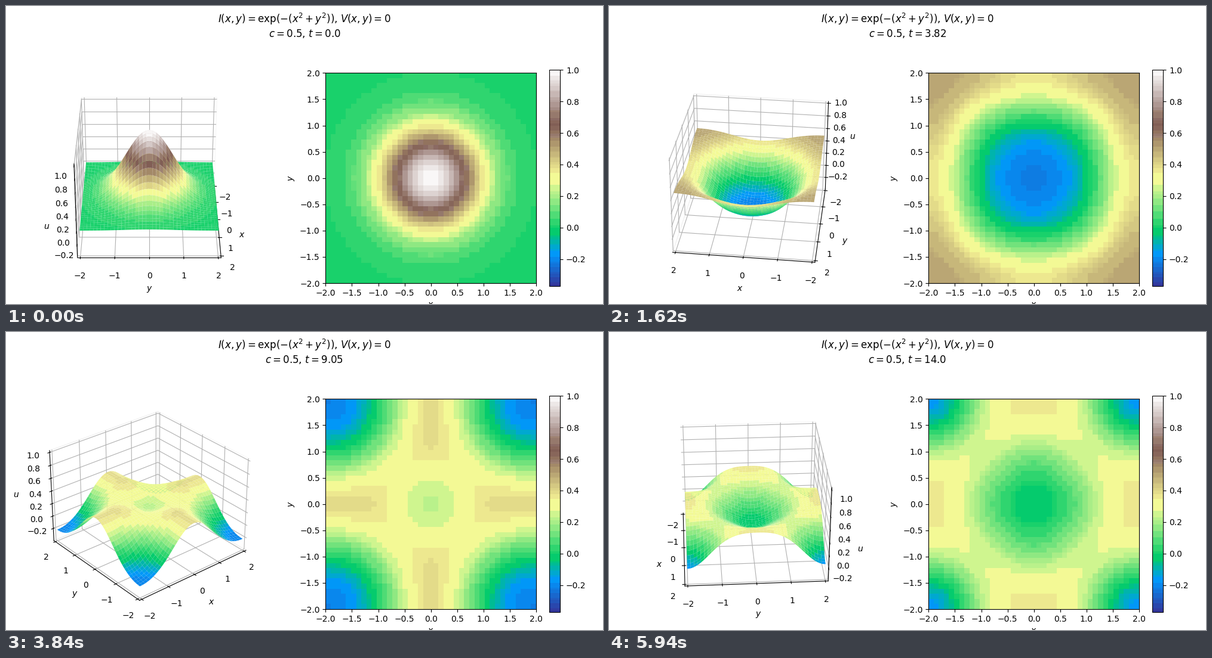
Recreate the animation shown at these times as a matplotlib script. Size 1000 px wide and 500 px high, loop 6000 ms.

```python
import matplotlib.pyplot as plt
import numpy as np
from matplotlib.animation import FuncAnimation
from matplotlib.colors import ListedColormap

WIDTH, HEIGHT, DPI = 1000, 500, 100
FRAMES, INTERVAL = 100, 60
C, END, N = 0.5, 14, 41

plt.rcParams["axes3d.automargin"] = True


def laplacian(u):
    """Five-point sum with reflecting edges."""
    p = np.pad(u, 1, mode="reflect")
    return p[2:, 1:-1] + p[:-2, 1:-1] + p[1:-1, 2:] + p[1:-1, :-2] - 4 * u


def solve_wave(u0, courant2, steps):
    waves = [u0, u0 + 0.5 * courant2 * laplacian(u0)]
    while len(waves) < steps:
        u = waves[-1]
        waves.append(2 * u - waves[-2] + courant2 * laplacian(u))
    return np.array(waves)


def banded_terrain():
    """Terrain colours merged into coarse RGB cells."""
    lut = np.round(plt.get_cmap("terrain")(np.arange(256))[:, :3] * 255).astype(int)
    _, group = np.unique(lut // [32, 16, 32], axis=0, return_inverse=True)
    group = group.ravel()
    return ListedColormap([lut[group == g].mean(axis=0) / 255 for g in group])


def corners(a):
    """Four corner values of every grid cell."""
    return np.stack([a[:-1, :-1], a[:-1, 1:], a[1:, 1:], a[1:, :-1]], axis=-1).reshape(-1, 4)


def rect(left, bottom, width, height):
    return [left / WIDTH, bottom / HEIGHT, width / WIDTH, height / HEIGHT]


grid = np.linspace(-2, 2, N)
x, y = np.meshgrid(grid, grid)
times = np.linspace(0, END, FRAMES)
courant2 = (C * times[1] / (grid[1] - grid[0])) ** 2
waves = solve_wave(np.exp(-(x**2 + y**2)), courant2, FRAMES)
style = dict(cmap=banded_terrain(), vmin=waves.min(), vmax=waves.max())

fig = plt.figure(figsize=(WIDTH / DPI, HEIGHT / DPI), dpi=DPI)
title = fig.suptitle("")

ax3d = fig.add_axes(rect(53.6, 29.8, 363, 363), projection="3d")
surface = ax3d.plot_surface(x, y, waves[0], rstride=1, cstride=1, **style)
ax3d.set(xlim=(-2, 2), ylim=(-2, 2), zlim=(style["vmin"], style["vmax"]),
         xticks=range(-2, 3), yticks=range(-2, 3), zticks=np.arange(-1, 6) / 5,
         xlabel="$x$", ylabel="$y$", zlabel="$u$")
for axis in (ax3d.xaxis, ax3d.yaxis, ax3d.zaxis):
    axis.pane.fill = False

ax2d = fig.add_axes(rect(535.3, 34.9, 352.8, 352.8))
image = ax2d.imshow(waves[0], origin="lower", extent=(-2, 2, -2, 2), **style)
ax2d.set(xlabel="$x$", ylabel="$y$")
fig.colorbar(image, cax=fig.add_axes(rect(910.1, 29.8, 18.15, 363)))

cell_x, cell_y = corners(x), corners(y)


def update(i):
    cell_z = corners(waves[i])
    surface.set_verts(np.stack([cell_x, cell_y, cell_z], axis=-1))
    surface.set_array(cell_z.mean(axis=1))
    ax3d.view_init(elev=30, azim=360 * i / FRAMES)
    image.set_data(waves[i])
    title.set_text(r"$I(x, y) = \exp(-(x^2 + y^2))$, $V(x, y) = 0$" "\n"
                   f"$c = {C}$, $t = {round(float(times[i]), 2)}$")
    return surface, image, title


animation = FuncAnimation(fig, update, frames=FRAMES, interval=INTERVAL,
                          repeat=True, repeat_delay=0)
plt.show()
```
